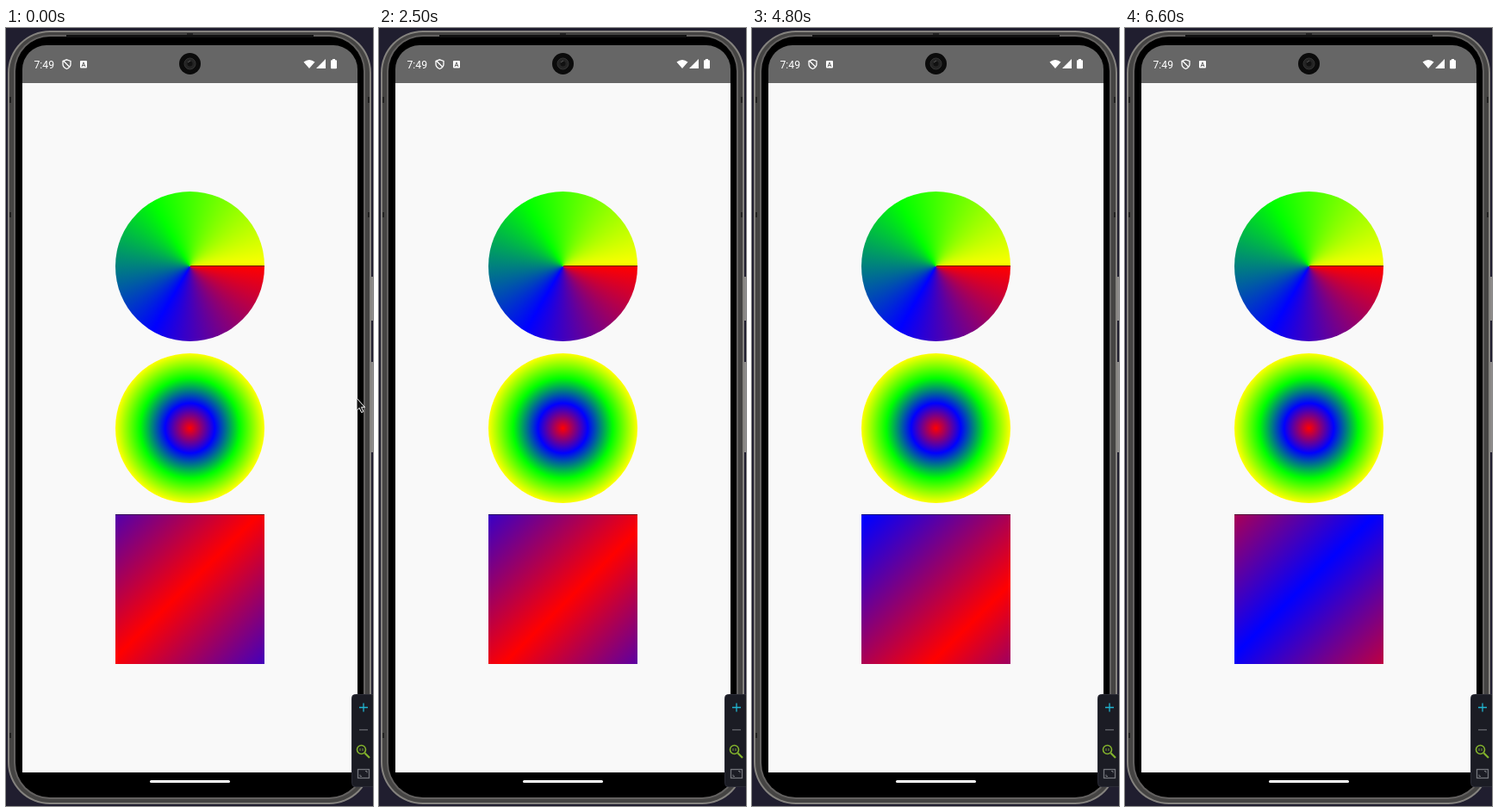
An HTML page that plays this animation: 426 px wide and 904 px high, repeating every 6.7 s.

```html
<!DOCTYPE html>
<html lang="en">
<head>
<meta charset="utf-8">
<title>Gradient brushes</title>
<style>
  html, body { margin: 0; width: 100%; height: 100%; overflow: hidden; background: #201e2f; }
  svg { position: absolute; left: 0; top: 0; }
  .shape { position: absolute; left: 127px; width: 173px; height: 173.5px; }
  .round { border-radius: 50%; }
  #sweep {
    top: 190px;
    background:
      linear-gradient(#600, #600) 100% 50% / 50% 1px no-repeat,
      conic-gradient(from 90deg, red, blue, lime, yellow);
  }
  #radial { top: 378px; background: radial-gradient(closest-side, red, blue, lime, yellow); }
  #linear {
    top: 565px; height: 174px;
    box-shadow: inset 0 1px rgba(0, 0, 0, .5);
    background: repeating-linear-gradient(135deg,
      red calc(var(--red) * 1%),
      blue calc((var(--red) + var(--span)) * 1%),
      red calc((var(--red) + 2 * var(--span)) * 1%));
  }
</style>
</head>
<body>
<svg width="426" height="904" viewBox="0 0 426 904">
  <!-- side buttons -->
  <path d="M423 289h3v51h-3zM423 388h3v105h-3z" fill="#8d8b8a"/>

  <!-- phone body -->
  <rect x="2" y="3" width="422" height="899" rx="49" fill="#85837f"/>
  <rect x="4" y="5" width="418" height="895" rx="47" fill="#454443"/>
  <rect x="9" y="8" width="408" height="888" rx="42" fill="#636160"/>
  <rect x="11" y="10" width="404" height="884" rx="40" fill="#000"/>
  <path d="M70 9.500H357" stroke="#111" stroke-width="3"/>
  <path d="M210 7h7M5 80v7M5 214v6M5 819v6M421 80v7M421 214v6" stroke="#222" stroke-width="2"/>

  <!-- screen -->
  <path d="M19 64V48A28 28 0 0 1 47 20H380A28 28 0 0 1 408 48V64Z" fill="#666"/>
  <path d="M19 64H408V865H19Z" fill="#f9f9f9"/>
  <rect x="167" y="874" width="93" height="3" rx="1.500" fill="#fff"/>

  <!-- camera -->
  <circle cx="213.500" cy="41.500" r="12.500" fill="#0b0b0b"/>
  <circle cx="213.500" cy="41.500" r="6.500" fill="#242424" stroke="#343434"/>
  <circle cx="213.500" cy="41.500" r="3" fill="#111"/>
  <path d="M211 40l3-2" stroke="#555"/>

  <!-- status bar -->
  <text x="32.500" y="46.500" font-family="Roboto, sans-serif" font-size="12.200" fill="#fff">7:49</text>
  <path d="M70.500 36.800l4.500 1.700v3.500q0 3.700-4.500 5.500q-4.500-1.800-4.500-5.500v-3.500zM67 38.500l7 7"
        fill="none" stroke="#fff" stroke-width="1.300"/>
  <rect x="86" y="38" width="8" height="8.500" rx="1" fill="#fff"/>
  <path d="M88 45l2-5.200l2 5.200M88.700 43.400h2.600" fill="none" stroke="#666"/>
  <path d="M345.500 39.500Q352 34.500 358.500 39.500L352 47ZM360 47L371 36V47Z" fill="#fff"/>
  <path d="M377 38.200q0-1 1-1h1v-1.200h3v1.200h1q1 0 1 1v8q0 1-1 1h-5q-1 0-1-1z" fill="#fff"/>

  <!-- zoom toolbar -->
  <rect x="401.500" y="774.500" width="30" height="107" rx="4" fill="#1b1c24" stroke="#2b2c36"/>
  <g fill="none" stroke-width="1.300">
    <path d="M410 789.500h10M415 784.500v10" stroke="#20b4d0"/>
    <path d="M410 815.500h10" stroke="#66686e"/>
    <circle cx="412.500" cy="838.500" r="5" stroke="#83b32c" stroke-width="1.600"/>
    <path d="M416.500 842.500l5.500 5.500" stroke="#83b32c" stroke-width="2.200"/>
    <path d="M411 837v3M414 837v3" stroke="#789b3a" stroke-width="1"/>
    <rect x="408.500" y="861.500" width="13" height="10" stroke="#74767c"/>
    <path d="M411 867.500v2h2M419 865.500v-2h-2" stroke="#74767c" stroke-width="1"/>
  </g>
</svg>
<div id="sweep" class="shape round"></div>
<div id="radial" class="shape round"></div>
<div id="linear" class="shape"></div>
<svg id="cursor" width="426" height="904">
  <path d="M407 430v14.500l3.200-3l2.400 5.200l2.300-1l-2.300-5h4z" fill="#111" stroke="#fff"/>
</svg>
<script>
  const LOOP = 6700, STEP = 100;
  const SPAN = 100 * Math.SQRT1_2;  // red-to-blue distance, % of the diagonal
  const START = 48, SPEED = 53.7;   // red band position and drift, % per second
  const linear = document.getElementById("linear");
  const cursor = document.getElementById("cursor");
  linear.style.setProperty("--span", SPAN);

  function draw() {
    const t = Math.floor(performance.now() % LOOP / STEP) * STEP;
    linear.style.setProperty("--red", (START - SPEED * t / 1000) % (2 * SPAN));
    cursor.style.display = t < 300 ? "" : "none";
    requestAnimationFrame(draw);
  }
  draw();
</script>
</body>
</html>
```
